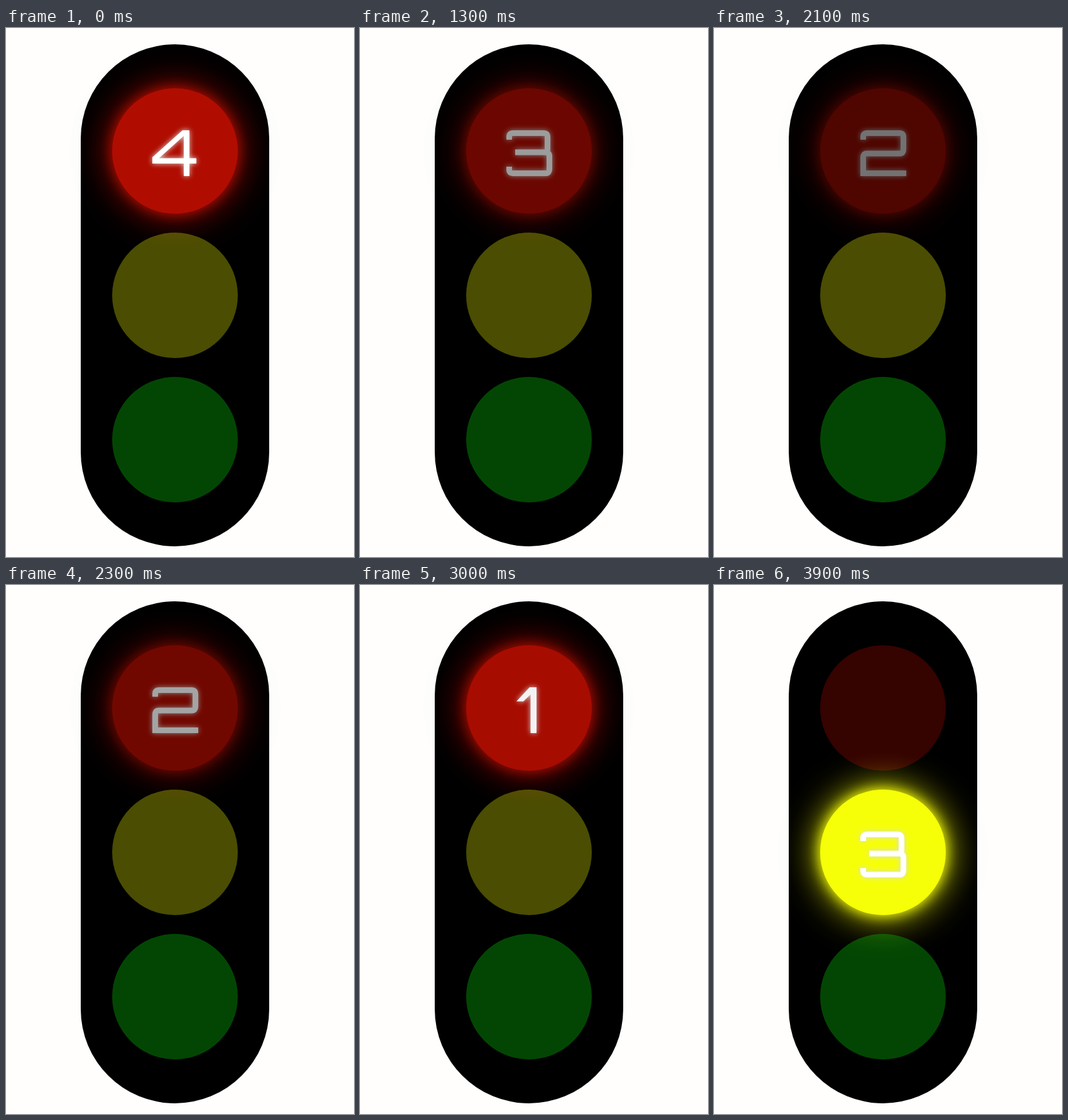
Recreate the animation shown at these times as an HTML page. Size 554 by 843 pixels, loop 4.5 s.

```html
<!DOCTYPE html>
<html lang="en">
<head>
<meta charset="utf-8">
<title>Traffic light</title>
<style>
  html, body { margin: 0; width: 554px; height: 843px; overflow: hidden; background: #fffefd; }
  body { position: relative; }
  .halo {
    position: absolute; left: 101px; width: 336px; height: 336px;
    border-radius: 50%; background: #fdfdfb;
  }
  .case {
    position: absolute; left: 119px; top: 26px; width: 300px; height: 800px;
    border-radius: 150px; background: #000; overflow: hidden;
  }
  .lamp {
    position: absolute; left: 50px; width: 200px; height: 200px;
    border-radius: 50%; background: currentColor; opacity: .3;
  }
  .lamp.on { box-shadow: 0 0 20px currentColor, 0 0 60px currentColor; }
  .red { top: 70px; color: #b00d00; }
  .yellow { top: 300px; color: #f6ff08; }
  .green { top: 530px; color: #0ae80a; }
  svg { display: block; filter: drop-shadow(0 0 4px #ddd); }
  .line { fill: none; stroke: #fff; stroke-width: 9; }
  .solid { fill: #fff; fill-rule: evenodd; }
</style>
</head>
<body>
<div class="halo"></div>
<div class="case">
  <div class="lamp red"></div>
  <div class="lamp yellow"></div>
  <div class="lamp green"></div>
</div>
<script>
  const LOOP = 4500, STEP = 100;
  const BLINK_START = 740, HALF_BLINK = 1044, DIM = 0.3;

  // Digit outlines, relative to the lamp's 200 x 200 box
  const digits = {
    1: ['solid', 'M101 67H112V140H102.5V78.5L91 89.5H80Z'],
    2: ['line', 'M68.5 82V77Q68.5 71.5 74 71.5H127Q132.5 71.5 132.5 77V98Q132.5 104 127 104H74Q68.5 104 68.5 110V135.5H137'],
    3: ['line', 'M68.5 82V77Q68.5 71.5 74 71.5H124Q129.5 71.5 129.5 77V97Q129.5 102 125 102H78' +
                'M125 102Q132.5 102 132.5 108V129Q132.5 135.5 126.5 135.5H74Q68.5 135.5 68.5 130V125'],
    4: ['solid', 'M112 67H123V111.5H134V120H123V140H114V120H64V110ZM114 76L74.5 111.5H114Z']
  };

  const halo = document.querySelector('.halo');
  const red = document.querySelector('.red');
  const yellow = document.querySelector('.yellow');
  let shown = '';

  function light(lamp, digit) {
    const key = lamp.className + digit;
    if (key === shown) return;
    for (const l of [red, yellow]) {
      l.classList.toggle('on', l === lamp);
      l.innerHTML = '';
    }
    const [kind, d] = digits[digit];
    lamp.innerHTML = `<svg width="200" height="200" role="img" aria-label="${digit}">` +
      `<path class="${kind}" d="${d}"/></svg>`;
    halo.style.top = lamp.offsetTop - 42 + 'px';
    shown = lamp.className + digit;
  }

  function blink(t) {
    const phase = Math.max(0, t - BLINK_START) / HALF_BLINK;
    return DIM + (1 - DIM) * (1 + Math.cos(Math.PI * phase)) / 2;
  }

  function draw(now) {
    const t = Math.floor(now % LOOP / STEP) * STEP;
    const ticks = Math.floor((t - BLINK_START) / HALF_BLINK) + 1;
    const stop = ticks < 4;
    if (stop) light(red, 4 - Math.max(0, ticks));
    else light(yellow, 3);
    red.style.opacity = stop ? blink(t) : DIM;
    yellow.style.opacity = stop ? DIM : 1;
  }

  let start;
  function loop(now) {
    start ??= now;
    draw(Math.max(0, now - start));
    requestAnimationFrame(loop);
  }
  draw(0);
  requestAnimationFrame(loop);
</script>
</body>
</html>
```
